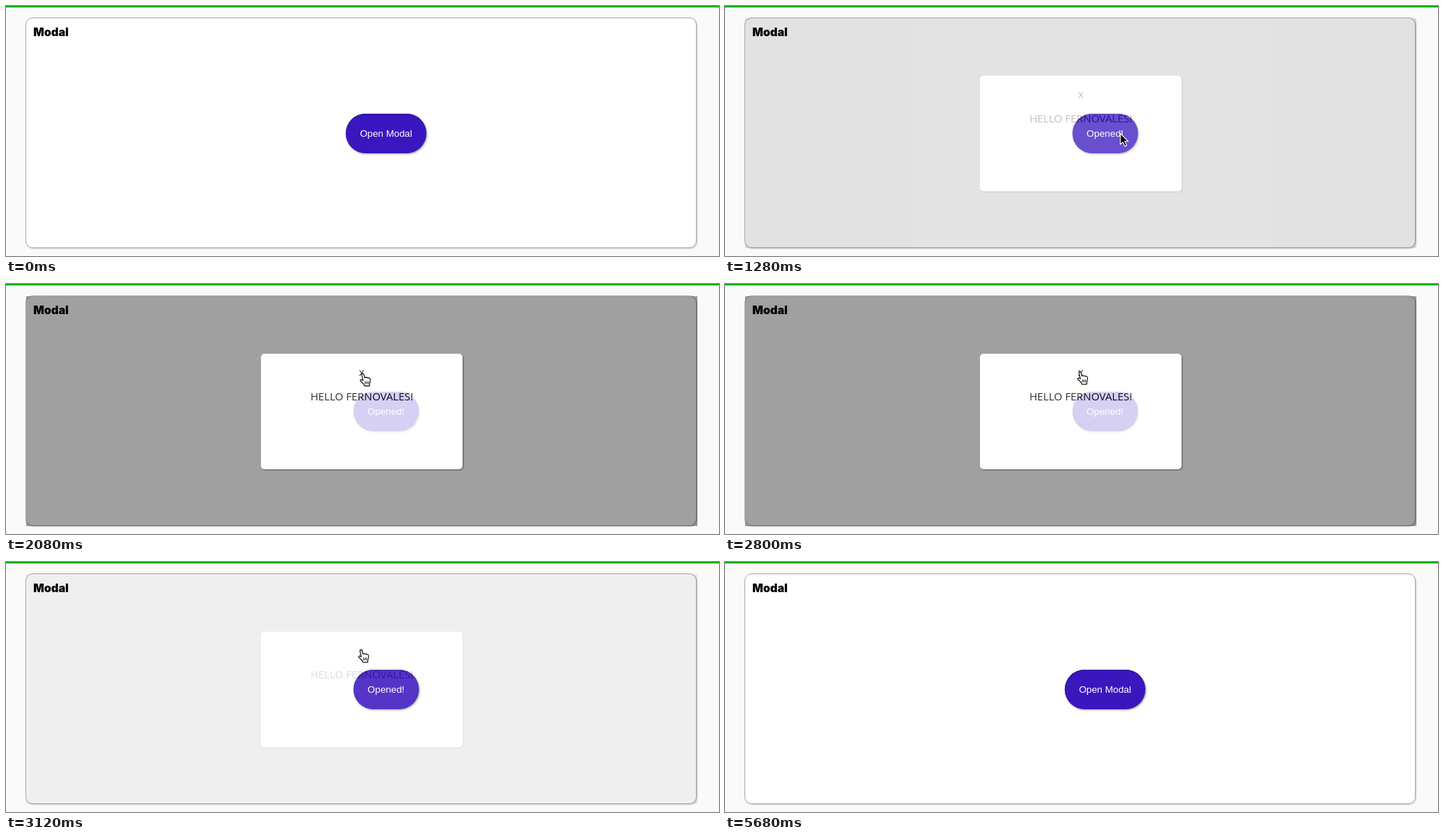
Recreate the animation shown at these times as an HTML page. Size 990 px wide and 348 px high, loop 5.76 s.

```html
<!DOCTYPE html>
<html lang="en">
<head>
<meta charset="utf-8">
<title>Modal</title>
<style>
  html, body { margin: 0; width: 100%; height: 100%; overflow: hidden; }
  body { position: relative; background: #fafafa; }
  body * { position: absolute; box-sizing: border-box; white-space: nowrap; }
  #bar { left: 0; top: 0; width: 100%; height: 2px; background: linear-gradient(#00b400 50%, #2a9a2a); }
  #card { left: 27px; top: 16px; width: 932px; height: 321px; background: #fff;
    border: 1px solid #a8a8a8; border-radius: 10px; box-shadow: 1px 1px 2px #ccc; }
  #title { left: 38px; top: 27px; font: 900 15.7px/20px Inter, sans-serif; color: #000; }
  #button { left: 527.7px; top: 149.5px; height: 55px; padding: 0 20px; transform: translateX(-50%);
    border-radius: 28px; background: #3a16bf; color: #fff; text-align: center;
    font: 13.333px/55px "Liberation Sans", Arial, sans-serif;
    box-shadow: inset 0 1px #24108a, 1px 1px 3px #999; }
  #overlay { left: 28px; top: 17px; width: 932px; height: 320px; background: rgba(0, 0, 0, .466); }
  #modal { left: 326px; top: 80px; width: 280px; height: 161px; border-radius: 5px; background: #fff;
    box-shadow: 1px 1px 2px rgba(0, 0, 0, .7); color: #000; text-align: center;
    font: 14.8px/20px "Open Sans", sans-serif; }
  #modal span { left: 0; width: 100%; }
  #close { top: 15px; }
  #hello { top: 49px; }
  #cursor { left: 0; top: 0; overflow: visible; }
</style>
</head>
<body>
<div id="bar"></div>
<div id="card"></div>
<div id="title">Modal</div>
<div id="button">Open Modal</div>
<div id="overlay">
  <div id="modal"><span id="close">x</span><span id="hello">HELLO FERNOVALES!</span></div>
</div>
<svg id="cursor" width="20" height="22">
  <path id="arrow" d="M0 0V15L3.5 11.8L6.2 17.7L8.7 16.6L6.1 10.8H10.8Z"
    fill="#000" stroke="#fff" stroke-width="1.1"/>
  <g id="hand" fill="#fff" stroke="#000" stroke-width="1.1" stroke-linejoin="round">
    <path d="M-1.6 1.2Q-.2 -.9 1.3 1L2.7 6.1Q4.1 4.8 5.1 6.2Q6.7 5.2 7.8 6.7Q9.5 6 10.2 7.8
      Q11 11 9.5 14L9.2 17.5H2.4L1.5 15L-3.4 10.4Q-3.7 8.6-1.7 8.8L.4 10Z"/>
    <path d="M3.4 11V15M5.5 11V15M7.6 11V15" fill="none" stroke-width=".9"/>
  </g>
</svg>
<script>
const LOOP = 5760, STEP = 80;
const OPEN = 1220, OPENED = 1420, CLOSE = 2920, CLOSED = 3160;
const $ = id => document.getElementById(id);
const ramp = (t, from, to) => Math.min(1, Math.max(0, (t - from) / (to - from)));
const ease = p => p * p * (3 - 2 * p);

// Pointer stops: time, x, y
const stops = [
  [160, 606, 360], [640, 549, 177.5], [1520, 549, 177.5],
  [2160, 493, 122], [3240, 493, 122], [3640, 560, -30]
];

function pointerAt(t) {
  let [, x, y] = stops[0];
  for (let i = 1; i < stops.length; i++) {
    const [from, x0, y0] = stops[i - 1], [to, x1, y1] = stops[i];
    if (t < from) break;
    const p = ease(ramp(t, from, to));
    x = x0 + (x1 - x0) * p;
    y = y0 + (y1 - y0) * p;
  }
  return [x, y];
}

function draw(now) {
  const t = Math.floor(now % LOOP / STEP) * STEP;
  $('overlay').style.opacity = .8 * (ramp(t, OPEN, OPENED) - ramp(t, CLOSE, CLOSED));
  $('button').textContent = t >= OPEN && t < CLOSED ? 'Opened!' : 'Open Modal';

  const [x, y] = pointerAt(t);
  const onClose = t >= 2080 && t < CLOSED;
  $('cursor').style.transform = `translate(${x}px, ${y}px)`;
  $('hand').style.display = onClose ? '' : 'none';
  $('arrow').style.display = onClose ? 'none' : '';
  requestAnimationFrame(draw);
}
draw(0);
</script>
</body>
</html>
```
